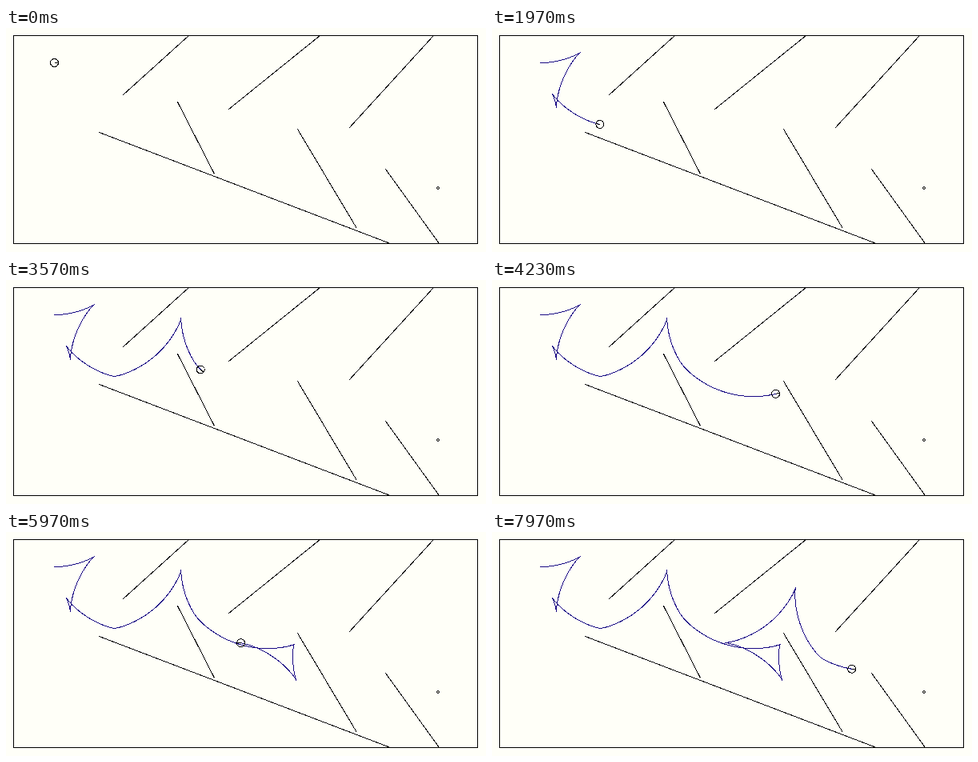
An HTML page that plays this animation: 600x280 px, repeating every 8 s.

```html
<!DOCTYPE html>
<html lang="en">
<head>
<meta charset="utf-8">
<title>Robot path</title>
<style>
  html, body { margin: 0; width: 100%; height: 100%; overflow: hidden; background: #fffff8; }
  svg { display: block; width: 600px; height: 280px; }
</style>
</head>
<body>
<svg viewBox="0 0 600 280" fill="none" stroke="#000" shape-rendering="crispEdges">
  <g transform="translate(.5 .5)">
    <path d="M9 9H589V269H9Z
      M146 83L228 9 M278 101L392 9 M428 125L534 9
      M116 130L480 269 M214 92L260 182 M364 126L438 250 M474 176L541 269"/>
    <circle cx="539.5" cy="199.5" r="1.5" shape-rendering="auto"/>
    <polyline id="trail" stroke="#1a0a84"/>
    <g id="robot"><circle r="5"/><path id="needle"/></g>
  </g>
</svg>
<script>
const LOOP = 8000, STEP = 1000 / 30, STEPS = 240;
const SPEED = 6;              // px per step
const RAMP = 6;               // steps to reach full speed
const TURN = Math.PI / 60;    // constant left turn per step
const DELAY = 2;              // steps before the turn sets in

// Turning points of the drive: x, y, and 1 for forwards or -1 for backwards.
const START = [60, 43];
const stops = [
  [110, 30, 1], [80, 100, -1], [75, 82, 1], [135, 120, -1],
  [218.5, 47, -1], [238, 106, 1], [359.5, 140, 1], [362.5, 185, -1],
  [291, 138, 1], [379, 69, -1], [410, 156, 1], [459, 171.5, 1]
];

const headingAt = step => -TURN * Math.max(0, step - DELAY);
const clamp = v => Math.max(0, Math.min(1, v));

// The robot never stops turning, so each leg is driven
// around the moment when the heading lines up with it.
function planLegs() {
  let [x, y] = START, last = 0;
  return stops.map(([toX, toY, dir]) => {
    const dx = toX - x, dy = toY - y;
    let heading = Math.atan2(dir * dy, dir * dx);
    while (heading > last) heading -= 2 * Math.PI;
    last = heading;
    [x, y] = [toX, toY];
    return { dx, dy, mid: DELAY - heading / TURN, half: Math.hypot(dx, dy) / SPEED / 2 };
  });
}

// Adds one leg's motion to the velocities, scaled to cover it exactly.
function driveLeg({ dx, dy, mid, half }, velocity) {
  const throttle = velocity.map((_, i) => clamp((half - Math.abs(i + .5 - mid)) / RAMP + .5));
  let cx = 0, cy = 0;
  throttle.forEach((v, i) => {
    cx += v * Math.cos(headingAt(i + .5));
    cy += v * Math.sin(headingAt(i + .5));
  });
  const norm = cx * cx + cy * cy;
  const re = (dx * cx + dy * cy) / norm, im = (dy * cx - dx * cy) / norm;
  throttle.forEach((v, i) => {
    const c = v * Math.cos(headingAt(i + .5)), s = v * Math.sin(headingAt(i + .5));
    velocity[i][0] += re * c - im * s;
    velocity[i][1] += re * s + im * c;
  });
}

const velocity = Array.from({ length: STEPS + 20 }, () => [0, 0]);
planLegs().forEach(leg => driveLeg(leg, velocity));

const path = [START];
for (let i = 0; i < STEPS - 1; i++) {
  path.push([path[i][0] + velocity[i][0], path[i][1] + velocity[i][1]]);
}

const [trail, robot, needle] =
  ["trail", "robot", "needle"].map(id => document.getElementById(id));

function draw(ms) {
  const n = Math.min(STEPS - 1, Math.floor((ms + 4) / STEP));
  const h = headingAt(n);
  trail.setAttribute("points", path.slice(0, n + 1).join(" "));
  robot.setAttribute("transform", `translate(${path[n]})`);
  needle.setAttribute("d", `M0 0L${5 * Math.cos(h)} ${5 * Math.sin(h)}`);
}

const t0 = performance.now();
function tick() {
  draw((performance.now() - t0) % LOOP);
  requestAnimationFrame(tick);
}
draw(0);
requestAnimationFrame(tick);
</script>
</body>
</html>
```
